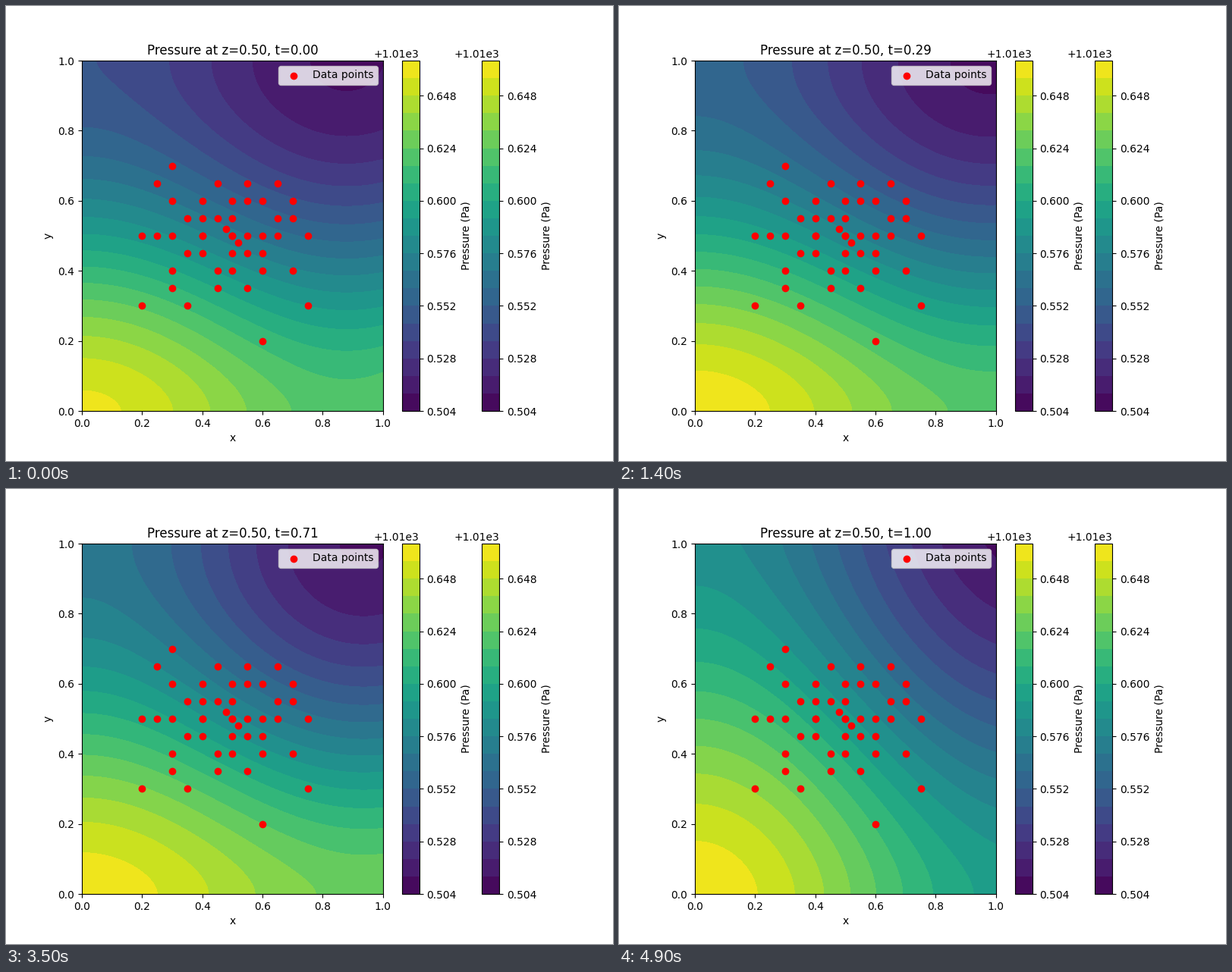
Animation, 800 px wide and 600 px high, one loop 5000 ms. Source, as a matplotlib script:

```python
import numpy as np
import matplotlib.pyplot as plt
from matplotlib.animation import FuncAnimation

FRAMES = 50
BASE, STEP = 1010.504, 0.008

# Sensor positions: y -> x values
SENSORS = {
    0.70: [0.3],
    0.65: [0.25, 0.45, 0.55, 0.65],
    0.60: [0.3, 0.4, 0.5, 0.55, 0.6, 0.7],
    0.55: [0.35, 0.4, 0.45, 0.5, 0.65, 0.7],
    0.52: [0.48],
    0.50: [0.2, 0.25, 0.3, 0.4, 0.4, 0.5, 0.5, 0.55, 0.6, 0.65, 0.75],
    0.48: [0.52],
    0.45: [0.35, 0.4, 0.5, 0.55, 0.6],
    0.40: [0.3, 0.45, 0.5, 0.6, 0.7],
    0.35: [0.3, 0.45, 0.55],
    0.30: [0.2, 0.35, 0.75],
    0.20: [0.6],
}
sensor_x, sensor_y = zip(*[(x, y) for y, xs in SENSORS.items() for x in xs])

# Key points of the motion, one column per key time
KEY_FRAMES = [0, 6, 14, 21, 29, 40, 49]
SOURCE = [19.25, 18.5, 19.75, 19.04, 19.32, 18.1, 18.7]   # x=0, y=0
RIGHT = [14.5, 13.95, 14.75, 14.5, 16.2, 13.5, 10.5]      # x=1, y=0
TOP = [5.03, 4.42, 6.36, 6.38, 6.43, 8.38, 9.2]           # x=0, y=1
SINK = [0.8, 0.15, 0.75, 0.54, 0.97, 0.8, 0.45]           # x=1, y=1
SINK_X = [0.88, 0.95, 0.98, 0.96, 0.92, 0.95, 1.1]        # where the low sits

grid = np.linspace(0, 1, 100)


def falloff(s, end):
    """Half cosine wave from 1 at s = 0 to 0 at s = end."""
    return (1 + np.cos(np.pi * s / end)) / 2


def pressure(i):
    """Blend four corner pressures with cosine falloffs in x and y."""
    source, right, top, sink, sink_x = (
        np.interp(i, KEY_FRAMES, track)
        for track in (SOURCE, RIGHT, TOP, SINK, SINK_X))
    fx = falloff(grid, sink_x)
    fy = falloff(grid ** 0.87, max(1, sink_x))[:, None]
    lower = right + (source - right) * fx
    upper = sink + (top - sink) * fx
    return BASE + STEP * (upper + (lower - upper) * fy)


fig, ax = plt.subplots(figsize=(8, 6), dpi=100)


def draw(i):
    ax.clear()
    contours = ax.contourf(grid, grid, pressure(i), levels=20, cmap="viridis")
    ax.scatter(sensor_x, sensor_y, c="red", label="Data points")
    ax.set(xlim=(0, 1), ylim=(0, 1), xlabel="x", ylabel="y",
           title=f"Pressure at z=0.50, t={i / (FRAMES - 1):.2f}")
    ax.legend(loc="upper right")
    return contours


first = draw(0)
for _ in range(2):
    fig.colorbar(first, ax=ax, label="Pressure (Pa)")


def update(i):
    draw(i)
    return []


anim = FuncAnimation(fig, update, frames=FRAMES, interval=100,
                     init_func=lambda: [], repeat=True, repeat_delay=0)

plt.show()
```
